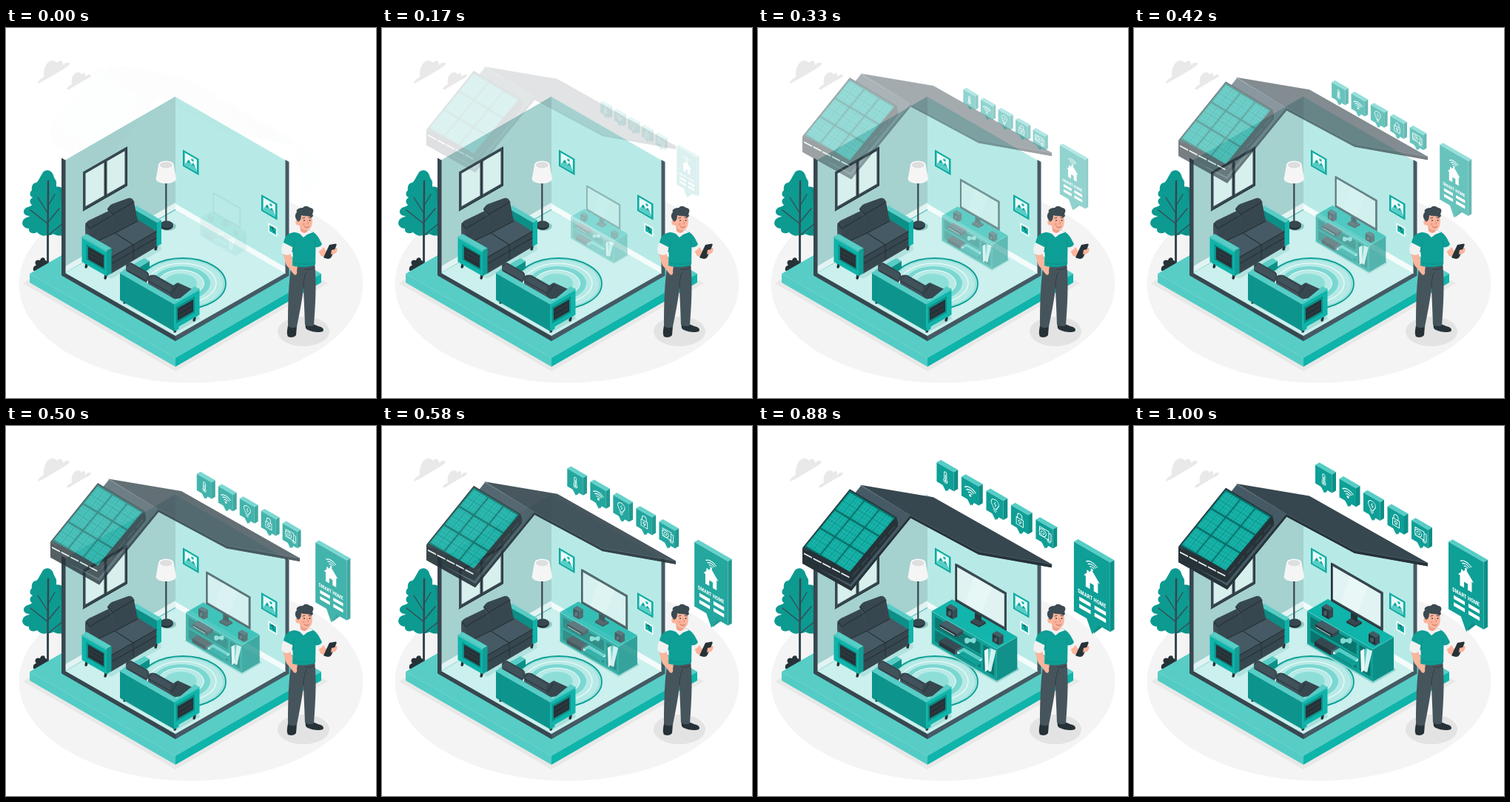
Animation of 500x500 px, one loop 1.04 s. Source, as an HTML page with a canvas:

```html
<!DOCTYPE html>
<html lang="en">
<head>
<meta charset="utf-8">
<title>Smart home</title>
<style>
html, body { margin: 0; width: 100%; height: 100%; overflow: hidden; background: #fff; }
canvas { display: block; width: 100vw; height: 100vh; }
</style>
</head>
<body>
<canvas id="stage" width="500" height="500"></canvas>
<script>
const LOOP = 1040, STEPS = 25, ISO = 0.577;
const C = {
  teal: '#0fb4aa', deep: '#0e9f96', dim: '#0c8f87', shade: '#0a756e', light: '#57cdc6', pale: '#b7eae6',
  ink: '#37474f', night: '#263238', slate: '#455a64', skin: '#fab59d', white: '#fff'
};
const stage = document.getElementById('stage').getContext('2d');
const buffer = Object.assign(document.createElement('canvas'), { width: 500, height: 500 }).getContext('2d');
let g = stage;

// ---- drawing helpers ----
function fill(color, d) {
  g.fillStyle = color;
  g.fill(new Path2D(d));
}
function line(color, width, d) {
  g.strokeStyle = color;
  g.lineWidth = width;
  g.lineCap = g.lineJoin = 'round';
  g.stroke(new Path2D(d));
}
function oval(color, x, y, rx, ry = rx, width = 0) {
  g.beginPath();
  g.ellipse(x, y, rx, ry, 0, 0, 7);
  g.fillStyle = g.strokeStyle = color;
  g.lineWidth = width;
  width ? g.stroke() : g.fill();
}
// Parallelogram with upright sides
function wall(color, x, y, w, h, slope = ISO) {
  fill(color, `M${x} ${y}l${w} ${w * slope}v${h}l${-w} ${-w * slope}Z`);
}
// Isometric box, placed by the left corner of its top
function box(x, y, w, d, h, top, front, side) {
  fill(top, `M${x} ${y}l${d} ${-d * ISO}l${w} ${w * ISO}l${-d} ${d * ISO}Z`);
  wall(front, x, y, w, h);
  wall(side, x + w, y + w * ISO, d, h, -ISO);
}
function skew(x, y, draw, slope = ISO) {
  g.save();
  g.transform(1, slope, 0, 1, x, y);
  draw();
  g.restore();
}
function layer(alpha, draw) {
  buffer.clearRect(0, 0, 500, 500);
  g = buffer;
  g.save();
  draw();
  g.restore();
  g = stage;
  g.globalAlpha = Math.min(1, alpha);
  g.drawImage(buffer.canvas, 0, 0);
  g.globalAlpha = 1;
}
function zoom(x, y, s) {
  g.translate(x, y);
  g.scale(s, s);
  g.translate(-x, -y);
}

// ---- easing ----
function bezier(x1, y1, x2, y2) {
  const at = (u, a, b) => 3 * (1 - u) * (1 - u) * u * a + 3 * (1 - u) * u * u * b + u * u * u;
  return p => {
    let lo = 0, hi = 1;
    for (let i = 0; i < 24; i++) {
      const mid = (lo + hi) / 2;
      at(mid, x1, x2) < p ? lo = mid : hi = mid;
    }
    return at(hi, y1, y2);
  };
}
const spring = bezier(0.36, -0.01, 0.5, 1.38);
const easeOut = bezier(0, 0, 0.58, 1);

// ---- scenery ----
function clouds() {
  const c = '#e9e9e9';
  fill(c, 'M43 75C44 70 48 68 51 66C50 54 56 43 63 44C66 44 67 45 69 47C72 43 77 44 77 50C81 46 85 46 86 48C85 52 81 53 77 56L46 74Z');
  fill(c, 'M82 83C83 79 86 78 89 76C87 67 93 59 98 60C100 60 101 61 102 63C105 59 108 61 107 66C111 62 114 62 115 64C114 67 111 68 107 70L85 83Z');
}
function tree() {
  line(C.ink, 3, 'M56.500 240V326');
  fill(C.dim, 'M66 216C70 213 76 215 78 219V280C68 282 62 278 60 274Z');
  fill('#0d9a91', 'M50 195C54 190 62 192 64 199C65 204 69 206 68 211C67 216 74 220 73 227C72 233 77 238 75 245C73 251 76 258 73 266C70 276 63 281 55 280C49 282 45 279 42 276C37 279 30 277 31 271C25 271 20 266 23 260C25 256 30 256 32 254C25 254 22 249 25 245C28 241 33 242 35 239C31 236 32 231 36 229C31 227 32 222 35 219C34 213 37 209 41 209C44 207 46 201 50 195Z');
  line(C.ink, 2.4, 'M56.500 325C56 285 57 250 57 207');
  line(C.ink, 1.2, 'M57 265L33 246M57 251L43 229M57 262L72 244M57 240L66 225M57 280L77 264');
  fill(C.night, 'M37 328C36 322 39 321 41 321C37 315 42 312 46 314C47 309 53 309 53 314C58 315 57 320 55 323C59 325 57 329 53 329Z');
}
function picture(x, y) {
  wall(C.deep, x, y, 21.5, 22);
  wall(C.teal, x + 1, y + 1.5, 19.5, 20);
  skew(x, y, () => {
    g.fillStyle = '#e9f8f7';
    g.fillRect(2.6, 2.6, 16.3, 16.8);
    fill(C.light, 'M2.600 18L8 9L11 13L14 10L18.900 17V19.400H2.600Z');
    fill(C.deep, 'M8 9L11 13L9 12L7.500 14L5.700 13ZM14 10L17 14L14 13L12 14.500Z');
    oval(C.teal, 13, 6.5, 1.7);
  });
}
function room() {
  fill('#e8e8e8', 'M23 345L229 226L435 345L229 464Z');
  box(32, 332, 197, 197, 12, C.light, '#53ccc5', C.teal);
  fill(C.slate, 'M76 334L229 246L382 334L229 423Z');
  fill(C.ink, 'M76 329L229 417V423L76 335Z');
  fill(C.slate, 'M229 417L382 329V335L229 423Z');
  fill('#cbf0ed', 'M80 331L229 246L378 331L229 416Z');
  wall('#a5d1cf', 80, 178.5, 149, 152, -ISO);
  wall(C.pale, 229, 93, 149, 153);
  wall('#e2f3f2', 80, 322, 149, 8.5, -ISO);
  wall('#f3fcfb', 229, 237.5, 149, 8.5);
  fill(C.ink, 'M75 175.500L80.500 178.800V331L76 335L75 334Z');
  fill(C.slate, 'M377.500 178L382.500 181V335L377.500 331Z');

  wall(C.ink, 104, 194.5, 59.5, 53, -ISO);
  wall('#d7efed', 107.5, 196.5, 25, 44.5, -ISO);
  wall('#d7efed', 136.5, 180, 24, 44.5, -ISO);
  line(C.night, 1, 'M104 247L163.500 213V161M134.500 181V228');

  picture(239, 164.5);
  picture(345, 225);
  wall('#f5fffe', 354.5, 263, 12, 12.5);
  wall(C.teal, 356, 266, 9, 8.5);
  line(C.ink, 1.1, 'M358 270C361 268 362 271 360 273M362 274V276');
}
function lamp() {
  oval('#8fc9c4', 219, 268, 11, 6);
  oval(C.night, 217, 267, 9, 6);
  oval(C.ink, 217, 265.5, 8.5, 5);
  line(C.ink, 2.2, 'M216.300 205V265');
  fill('#f5f5f5', 'M206 185L202.500 204C204 212 228 212 230 204L226.500 185Z');
  oval('#fafafa', 216.3, 185, 10.3, 5.5);
  oval('#dedede', 216.3, 185.3, 8.5, 4.2);
}
function rug() {
  oval('#9fe2dd', 239, 345.5, 58, 34.5);
  oval(C.deep, 239, 345.5, 58, 34.5, 1.8);
  oval('#b7eae6', 238.5, 345.5, 54.5, 32);
  oval('#f1fcfb', 238, 345, 46, 27, 1.2);
  oval('#7ad7d1', 237, 345, 39, 23);
  oval('#b7eae6', 236.5, 345, 31, 18);
  oval('#f1fcfb', 236.5, 345, 31, 18, 1);
  oval('#8eded8', 236, 345, 22, 13);
}
function feet(...spots) {
  for (let i = 0; i < spots.length; i += 2)
    line(C.night, 3.6, `M${spots[i]} ${spots[i + 1]}l-.8 4`);
}
function backSofa() {
  fill('#b2e2de', 'M104 318L142 339L210 300L208 286Z');
  feet(109, 319, 135, 334, 203, 295);
  box(170, 243.5, 34, 6, 32, C.light, C.dim, C.teal);
  fill(C.ink, 'M142 309L203 274V296L142 332Z');
  fill(C.slate, 'M113 287L172 255L203 275L142 310Z');
  fill(C.ink, 'M107 268C107 264 109 262 112 260L137 248C141 247 144 249 144 252L148 277L117 292L108 286Z');
  fill('#3e4f58', 'M107 266L112 272L117 292L108 286Z');
  fill(C.ink, 'M137 245C138 242 140 240 143 238L165 230C169 229 172 231 173 235L178 261L147 278L142 255Z');
  fill('#41525b', 'M137 245L143 252L147 278L143 257Z');
  line(C.night, 1.1, 'M117 291L147 277L178 261M147 277L172 293V312M142 310L203 275M108 264L113 271L144 253M138 244L144 252L173 235M142 319L203 284');
  box(102.5, 282, 33.5, 6.5, 34, C.light, C.teal, C.deep);
  wall(C.light, 102.5, 282, 33.5, 1.5);
  wall(C.dim, 108.5, 292, 25, 21);
  wall(C.night, 111, 295.5, 21, 17);
  line(C.ink, 0.8, 'M113 302L131 312M113 307L131 317');
}
function frontSofa() {
  fill('#a9deda', 'M157 371L230 411L262 393L258 383Z');
  feet(161, 367, 229, 406, 255, 391);
  fill(C.light, 'M158 327L187 311L194 315L165 333Z');
  fill(C.dim, 'M165 333L194 315V325L172 338Z');
  fill(C.ink, 'M162 321C163 318 166 317 169 317L190 329C193 331 194 333 193 340L185 347L163 334Z');
  fill('#41525b', 'M162 325L167 318L191 332L190 345L163 333Z');
  fill(C.ink, 'M192 337C194 333 198 333 202 334L225 347L230 352L226 369L192 349Z');
  fill('#41525b', 'M192 342L199 335L223 349L222 366L192 349Z');
  fill(C.ink, 'M224 349L232 344L254 354L237 365L224 367Z');
  line(C.night, 1, 'M164 328L190 342M193 342L224 359L232 347');
  box(154, 330.5, 73.5, 6, 37, C.light, '#0d958d', C.teal);
  fill(C.light, 'M227 372L255 349L262 353L229 374Z');
  wall(C.teal, 227.5, 372, 34, 35, -ISO);
  wall(C.light, 227.5, 372, 34, 1.5, -ISO);
  wall(C.dim, 230, 377, 25, 22, -ISO);
  wall(C.night, 232, 379, 21, 16, -ISO);
  line(C.ink, 0.8, 'M233 384L252 373M233 390L252 379');
  line(C.light, 1.5, 'M154.500 331L227 372.500');
  line(C.dim, 1, 'M160 335V366M222 371V402');
}
function man() {
  oval('#e3e3e3', 402, 410, 35, 20);
  fill(C.night, 'M381 402C380 408 379 413 381 417C385 419 390 418 392 415L393 403ZM405 400C404 404 405 407 408 408C414 411 423 412 428 410C431 407 427 404 422 403L415 400Z');
  fill('#46545c', 'M386 318L417 317C420 345 418 375 416 402C412 404 407 403 404 401L402 350C400 370 396 388 393 404C389 406 384 405 381 403C381 370 382 340 386 318Z');
  line(C.night, 0.7, 'M402 350C402 342 403 336 406 330M404 326C409 327 414 326 417 323');
  fill(C.skin, 'M374 304C377 313 377 320 382 324L389 333C392 335 394 332 393 328L394 322L389 318C387 311 385 308 384 304Z');
  fill(C.skin, 'M421 298L425 307C429 311 434 308 440 306C446 306 449 301 447 297L439 297L432 301L429 295Z');
  fill('#f1f1f1', 'M419 296C420 300 422 302 424 301L430 296L426 289Z');
  fill(C.deep, 'M392 276C399 272 409 272 414 275C421 279 424 286 427 292C425 296 421 297 418.500 296L418 320C410 324 394 324 387 321L388 302C384 306 378 303 376 298L378 286C379 279 385 277 392 276Z');
  fill('#f1f1f1', 'M376 287C372 296 371 303 374 305C379 308 383 307 386 304L388 293Z');
  fill(C.deep, 'M375 290C377 280 382 277 390 276L389 297Z');
  line(C.dim, 0.8, 'M389 288L388 306M417 287L419 296M388 317C397 320 410 320 418 317');
  fill('#f3f3f3', 'M391 276C395 271 410 271 415 276L407 279L402 283L397 278Z');
  fill('#ee9f89', 'M397 266H408L408 274C405 278 401 278 398 274Z');
  fill(C.skin, 'M396 251C403 247 411 249 413 254C415 262 414 269 409 273C404 275 398 272 396 266Z');
  oval(C.skin, 394.5, 262.5, 3.2, 4);
  fill('#3c4a51', 'M395 262C391 258 389 253 393 249C391 244 398 243 401 243C404 239 409 241 411 243C415 243 417 247 414 251C416 254 414 256 412 256C409 253 404 255 399 253C399 257 398 260 396 261Z');
  oval(C.night, 403, 260, 0.8, 1.1);
  oval(C.night, 410.5, 260, 0.8, 1.1);
  line(C.night, 0.8, 'M401 257L404 256M409 256L412 257');
  line('#df806b', 0.8, 'M407.500 260L408.500 264.500L406.500 265');
  line('#a84c45', 0.8, 'M403 268C405 270 408 270 409.500 268');
  oval('#f69d87', 402, 265, 2, 1.5);
  fill(C.night, 'M437 293L445.500 291.500C447 291.500 447 293 446 295L440 309C439 311 437 312 435 312L431 311C429 311 429 309 430 308Z');
  fill(C.skin, 'M440 300C444 299 447 299 447 301L443 305L439 306Z');
}

// ---- moving parts ----
function cabinet() {
  fill('#8fd3ce', 'M231 294L323 348L354 330L345 318Z');
  box(234, 250, 89, 28, 44, C.teal, C.deep, C.dim);
  wall(C.shade, 238.5, 257.5, 62, 15.5);
  wall(C.shade, 238.5, 276, 62, 15.5);
  wall(C.shade, 304.5, 295.5, 15, 34.5);
  line(C.light, 0.8, 'M234.500 250.500L323 301.500L350.500 285.500');
  // media player, pad, boxes and books
  box(245, 268, 23, 9, 4.5, C.slate, C.night, C.ink);
  line('#d8f2f0', 1, 'M246 272L265 283');
  fill('#7edbd4', 'M279 288C282 284 285 288 287 288L293 286C297 290 292 297 290 293L286 292C282 296 280 294 279 292Z');
  box(244, 291, 22, 9, 6, C.ink, C.night, C.slate);
  box(269, 305, 25, 9, 3, C.light, '#e9f8f7', C.pale);
  box(270, 309, 24, 7, 3, C.deep, C.dim, C.deep);
  fill('#e9f8f7', 'M306 304L311 301L313 329L307 333Z');
  fill(C.light, 'M311 302L315 300L316 331L312 333Z');
  fill('#d3f1ef', 'M315 301L322 304L315 333L311 331Z');

  wall(C.night, 266, 184.5, 70.5, 52);
  wall(C.ink, 268, 185, 68.5, 51);
  wall('#e1f4f3', 268.8, 189.5, 64.5, 44.5);
  fill('#e9f8f7', 'M292 203L316 217L302 253L280 240Z');
  fill(C.night, 'M287 264L296 258L308 265V267L299 272L287 266Z');
  fill(C.ink, 'M287 264L296 258L308 265L299 270Z');
  fill(C.night, 'M293 252L302 257V265L293 260Z');
  box(254, 244, 9, 6, 12, C.slate, C.night, C.ink);
  box(317, 280.5, 9, 6, 11, C.slate, C.night, C.ink);
  oval(C.slate, 258.5, 253, 2.5, 3.5);
  oval(C.slate, 321.5, 289, 2.5, 3.3);
}
function solar() {
  // rail below the panel
  fill(C.night, 'M60 163L124 196L187 122L189 128V134L125 212L60 180Z');
  for (let i = 0; i < 5; i++) {
    wall('#e7eeee', 62 + i * 12.6, 169.5 + i * 6.6, 11, 2, 0.52);
    wall(C.ink, 128 + i * 12, 199 - i * 14.1, 9, 2.5, -1.17);
  }
  fill(C.night, 'M124 83.500L188 122L124 197L60 163Z');
  fill('#0a7069', 'M124 85.500L185.500 122.200L124 194L62.500 162Z');
  g.save();
  g.transform(63, 37.7, -63, 77, 124, 84.7);
  g.scale(1 / 30, 1 / 30);
  for (let i = 0; i < 9; i++) {
    const x = 0.9 + i % 3 * 9.6, y = 0.9 + Math.floor(i / 3) * 9.6;
    g.fillStyle = '#10aba1';
    g.fillRect(x, y, 8.8, 8.8);
    let grid = '';
    for (let n = 1; n < 5; n++) grid += `M${x + n * 1.76} ${y}v8.800M${x} ${y + n * 1.76}h8.800`;
    line('#3ac2ba', 0.14, grid);
    line(C.dim, 0.2, `M${x + 4.4} ${y}v8.800M${x} ${y + 4.4}h8.800`);
  }
  g.restore();
}
function roof() {
  fill(C.slate, 'M139 79L206 119V123L126 221L60 184V178Z');
  fill(C.night, 'M60 178L126 216L206 119V123L126 221L60 184Z');
  fill(C.ink, 'M139 78L237 94.500L397 185V189.500L298 171.500L206 122.500V119Z');
  fill(C.night, 'M206 119L298 168L397 185V189.500L298 172L206 122.500Z');
  line(C.slate, 1, 'M139 78.500L206 119L298 168L396 185');
  solar();
}

const icons = [
  () => {
    line(C.white, 0.9, 'M10 15.500V7.500C10 5.500 13 5.500 13 7.500V15.500C15.500 18 13 20.500 11.500 20.500C9.500 20.500 8 18 10 15.500Z');
    line(C.white, 0.9, 'M11.500 10V18');
    oval(C.white, 11.5, 18, 1.2);
  },
  () => wifi(11.5, 18, 0.95),
  () => {
    line(C.white, 0.9, 'M9.500 17C9.500 14 6.500 13 6.500 10C6.500 3 16.500 3 16.500 10C16.500 13 13.500 14 13.500 17ZM9.500 19H13.500M10.500 21H12.500');
    line(C.white, 0.8, 'M12 8L10.500 11H13L11.500 14');
  },
  () => {
    line(C.white, 0.9, 'M7 11H16V20H7ZM8.500 11V8C8.500 3.500 14.500 3.500 14.500 8V11');
    oval(C.white, 11.5, 15, 1.7, 1.7, 0.9);
    line(C.white, 0.9, 'M11.500 16.500V18');
  },
  () => {
    line(C.white, 0.9, 'M5 6H17V17H5ZM17 8H20V18H15');
    oval(C.deep, 9, 12, 4.5);
    oval(C.white, 9, 12, 4.5, 4.5, 0.9);
    oval(C.white, 9, 12, 2, 2, 0.8);
    line(C.white, 0.9, 'M16 17V20H19');
  }
];
function wifi(x, y, s) {
  oval(C.white, x, y, 1.6 * s);
  for (let r = 4; r < 12; r += 3.3) {
    g.beginPath();
    g.arc(x, y, r * s, -2.4, -0.74);
    g.strokeStyle = C.white;
    g.lineWidth = 1.3 * s;
    g.stroke();
  }
}
function signs() {
  icons.forEach((icon, i) => {
    const x = 245 + i * 32.5, y = 52.5 + i * 18.75;
    fill(C.dim, `M${x + 12} ${y + 32}l6 0l-4 6Z`);
    box(x, y, 22.5, 5.5, 25, C.light, C.deep, C.dim);
    fill(C.deep, `M${x + 7} ${y + 28}l10 5l-5 5Z`);
    skew(x, y, icon);
  });
  fill(C.dim, 'M450 262L463 268L451 277Z');
  box(425, 156.5, 47.5, 5.5, 91, C.light, C.deep, C.dim);
  fill(C.deep, 'M441 255L458 265L449 278Z');
  skew(425, 156.5, () => {
    wifi(23.5, 23.5, 0.95);
    fill(C.white, 'M23.500 24L34 36H31.500V50H26V42H21V50H15.500V36H13L17 31V27H19.500V28.500Z');
    g.fillStyle = C.white;
    for (const x of [7, 27]) for (const y of [68, 77.5]) g.fillRect(x, y, 15, 5);
  });
  g.save();
  g.transform(0.866, 0.5, 0, 1, 448.5, 233.5);
  const face = '"Roboto Condensed", "Open Sans Condensed", Roboto, sans-serif';
  g.font = 'bold 10px ' + face;
  g.font = `bold ${430 / g.measureText('SMART HOME').width}px ${face}`;
  g.textAlign = 'center';
  g.fillStyle = C.white;
  g.fillText('SMART HOME', 0, 0);
  g.restore();
}

// ---- loop ----
function draw(p) {
  const bounce = spring(p), grow = easeOut(p);
  g.fillStyle = '#fff';
  g.fillRect(0, 0, 500, 500);
  oval('#f4f4f4', 250, 345.5, 232.5, 134);
  clouds();
  tree();
  room();
  lamp();
  rug();
  layer(grow, () => {
    zoom(295, 264.5, 0.5 + grow / 2);
    cabinet();
  });
  backSofa();
  frontSofa();
  layer(bounce, () => {
    g.translate(0, 30 * (bounce - 1));
    roof();
  });
  layer(bounce, () => {
    zoom(362.5, 163.5, 0.5 + bounce / 2);
    signs();
  });
  man();
}
const start = performance.now();
function tick(now) {
  const t = Math.max(0, now - start) % LOOP;
  const step = Math.min(STEPS - 1, Math.floor(t / LOOP * STEPS + 0.1));
  draw((step + 1) / STEPS);
  requestAnimationFrame(tick);
}
tick(start);
</script>
</body>
</html>
```
